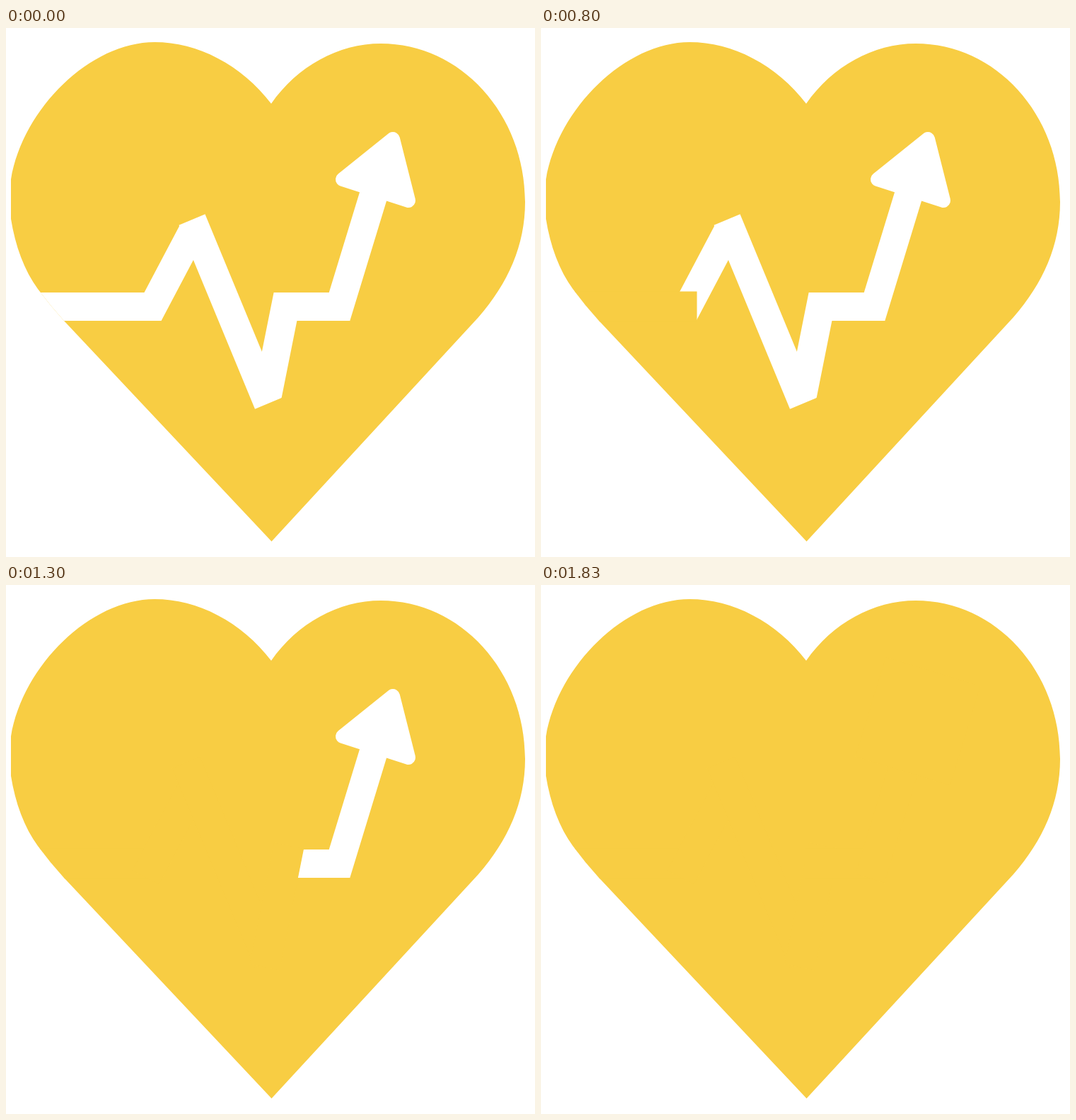
Recreate the animation shown at these times as an HTML page with a canvas. Size 748 px wide and 748 px high, loop 2060 ms.

```html
<!DOCTYPE html>
<html lang="en">
<head>
<meta charset="utf-8">
<title>Heart pulse</title>
<style>
html, body { margin: 0; width: 100%; height: 100%; overflow: hidden; background: #fff; }
canvas { display: block; width: 748px; height: 748px; }
</style>
</head>
<body>
<canvas id="stage" width="748" height="748"></canvas>
<script>
const SIZE = 748, LOOP = 2060, STEPS_PER_MS = 0.03;
const YELLOW = '#f8cd43', WHITE = '#fff';
const LINE = 40, WIPE = 43, LEAD = 22;
const ctx = document.getElementById('stage').getContext('2d');

const heart = new Path2D(`M375 107 C333 52 271 20 210 20 C120 20 24 113 7 214 V270
  C13 308 26 343 45 369 Q62 392 82 414 L375.5 726 L668 409
  C710 361 734 307 734 246 C734 122 643 22 530 22 C470 22 412 54 375 107Z`);

// Centre lines: up to the peak, down to the valley, on to the arrow head
const strands = [
  [[45, 394], [207.5, 394], [264, 287]],
  [[263, 271], [370.5, 531]],
  [[370, 519], [395, 394], [471.5, 394], [521, 232]]
];
const headCorners = [[547, 157], [476, 214], [569, 244]];

// Each leg is wiped in turn; "past" is how far the wipe runs over its corner
const legs = strands.flatMap(pts => pts.slice(1).map((to, i) => ({ from: pts[i], to })));
const past = [13, 0, 3, 26, 0, 0];
const durations = [6, 8, 4, 3, 3, 7];
const FIRST_START = 12, PAUSE = 6;
let start = FIRST_START;
legs.forEach((leg, i) => {
  Object.assign(leg, { start, steps: durations[i], past: past[i], width: WIPE });
  start += leg.steps + (i ? 0 : PAUSE);
});
const headLeg = { from: [518, 242], to: [553, 127], start, steps: 6, past: 5, width: 140 };

function trace(points) {
  ctx.beginPath();
  points.forEach(p => ctx.lineTo(...p));
}

function stroke(points, width, color) {
  trace(points);
  ctx.lineWidth = width;
  ctx.strokeStyle = color;
  ctx.stroke();
}

function wipe({ from: [x1, y1], to: [x2, y2], start, steps, past, width }, step) {
  const progress = Math.min(1, (step - start) / steps);
  if (progress <= 0) return;
  const length = Math.hypot(x2 - x1, y2 - y1);
  const at = d => [x1 + (x2 - x1) * d / length, y1 + (y2 - y1) * d / length];
  stroke([at(-LEAD), at((length + past) * progress)], width, YELLOW);
}

function drawHead() {
  ctx.save();
  ctx.lineJoin = 'round';
  trace(headCorners);
  ctx.closePath();
  ctx.lineWidth = 20;
  ctx.strokeStyle = ctx.fillStyle = WHITE;
  ctx.fill();
  ctx.stroke();
  ctx.restore();
}

function draw(step) {
  ctx.fillStyle = WHITE;
  ctx.fillRect(0, 0, SIZE, SIZE);
  ctx.save();
  ctx.clip(heart);
  ctx.fillStyle = YELLOW;
  ctx.fillRect(0, 0, SIZE, SIZE);
  strands.forEach(points => stroke(points, LINE, WHITE));
  legs.forEach(leg => wipe(leg, step));
  drawHead();
  wipe(headLeg, step);
  ctx.restore();
}

function tick() {
  const t = performance.now() % LOOP;
  draw(Math.floor((t + 4) * STEPS_PER_MS));
  requestAnimationFrame(tick);
}
tick();
</script>
</body>
</html>
```
